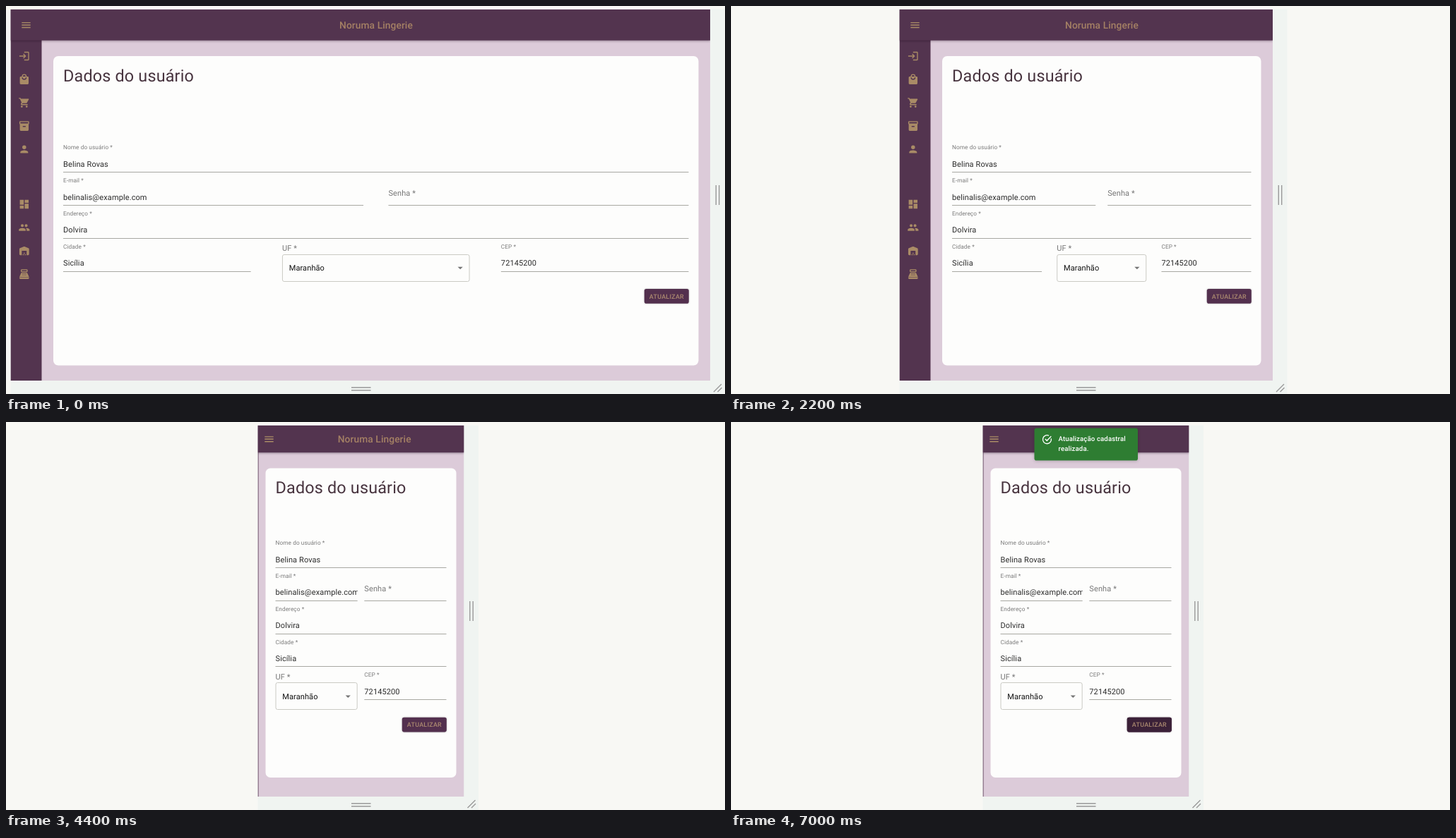
Write an HTML page that moves like this. It is 1018 px wide and 550 px high and loops after 8000 ms.

```html
<!DOCTYPE html>
<html lang="pt-BR">
<head>
<meta charset="utf-8">
<title>Dados do usuário</title>
<style>
  html, body { margin: 0; width: 100%; height: 100%; overflow: hidden; background: #f8f8f4; }
  #stage { display: block; width: 1018px; height: 550px; }
  text { font-family: Roboto, "Open Sans", sans-serif; text-rendering: geometricPrecision; }
  .outside { fill: #f8f8f4; }
  .frame { fill: #f0f4f1; }
  .page { fill: #dccbd9; }
  .card { fill: #fdfdfc; }
  .bar { fill: #53344f; }
  .header { filter: drop-shadow(0 1px 1.5px rgba(30, 10, 30, .4)); }
  .gold { fill: #a98b66; }
  .brand { font-size: 13.75px; font-weight: 500; letter-spacing: .1px; text-anchor: middle; fill: #a48064; }
  .heading { font-size: 23.4px; letter-spacing: .17px; fill: #48343f; }
  .label { font-size: 8.25px; letter-spacing: .08px; fill: #7b7b7b; }
  .value { font-size: 11px; letter-spacing: .1px; fill: #2b2b2b; }
  .option { font-size: 11px; letter-spacing: .1px; fill: #111; }
  .empty { font-size: 11px; letter-spacing: .1px; fill: #777; }
  .rule { stroke: #a8a8a2; stroke-width: 1; }
  .select { fill: none; stroke: #cacac4; stroke-width: 1; }
  .action { font-size: 8.94px; font-weight: 500; letter-spacing: .255px; text-anchor: middle; fill: #ab8a70; }
  .normal { fill: #53304e; filter: drop-shadow(0 .5px .8px rgba(0, 0, 0, .3)); }
  .hover { fill: #3b2138; }
  .pressed { fill: #3b2138; filter: drop-shadow(0 2px 2.5px rgba(30, 10, 60, .35)); }
  .grip { fill: none; stroke: #999; stroke-width: 1.4; }
  .toast { filter: drop-shadow(0 1px 2px rgba(0, 0, 0, .2)); }
  .toast rect { fill: #2e7d32; }
  .toast path { fill: none; stroke: #fff; stroke-width: 1.3; }
  .toast text { font-size: 9.63px; font-weight: 500; letter-spacing: .1px; fill: #fff; }

  .timed { animation: 8s step-end infinite; }
  .tablet { animation-name: tablet; }
  .narrow { animation-name: narrow; }
  .phone { animation-name: phone; }
  .closed { animation-name: closed; }
  .pressed { animation-name: press; }
  .hover { animation-name: hover; }
  .toast { animation-name: toast; }
  @keyframes tablet { 0% { visibility: hidden } 20%, 100% { visibility: visible } }
  @keyframes narrow { 0% { visibility: hidden } 27.5%, 100% { visibility: visible } }
  @keyframes phone { 0% { visibility: hidden } 42.5%, 100% { visibility: visible } }
  @keyframes closed { 0% { visibility: hidden } 52.5%, 100% { visibility: visible } }
  @keyframes press { 0% { opacity: 0 } 70% { opacity: 1 } 75%, 100% { opacity: 0 } }
  @keyframes hover { 0% { opacity: 0 } 75%, 100% { opacity: 1 } }
  @keyframes toast { 0% { opacity: 0 } 72.5% { opacity: .6 } 75%, 100% { opacity: 1 } }
</style>
</head>
<body>
<svg id="stage" viewBox="0 0 1018 550"></svg>
<script>
const TOP = 4.7, BOTTOM = 531, ROW = 46.8, ICON = 0.6875;

const icons = [
  [71, 'M11 7 9.6 8.4l2.6 2.6H2v2h10.2l-2.6 2.6L11 17l5-5zM20 19h-8v2h8c1.1 0 2-.9 2-2V5c0-1.1-.9-2-2-2h-8v2h8z'],
  [104, 'M19 6h-2a5 5 0 0 0-10 0H5a2 2 0 0 0-2 2v12a2 2 0 0 0 2 2h14a2 2 0 0 0 2-2V8a2 2 0 0 0-2-2zm-7-3a3 3 0 0 1 3 3H9a3 3 0 0 1 3-3zm0 10a5 5 0 0 1-5-5h2a3 3 0 0 0 6 0h2a5 5 0 0 1-5 5z'],
  [137, 'M7 18a2 2 0 1 0 0 4 2 2 0 0 0 0-4zM1 2v2h2l3.6 7.6L5.2 14c-.7 1.3.2 3 1.8 3h12v-2H7.4l1.1-2h7.5c.7 0 1.4-.4 1.7-1L21.3 5.5c.4-.7-.1-1.5-.9-1.5H5.2L4.3 2zm16 16a2 2 0 1 0 0 4 2 2 0 0 0 0-4z'],
  [170, 'M20 2H4a2 2 0 0 0-2 2v3c0 .7.4 1.3 1 1.7V20a2 2 0 0 0 2 2h14a2 2 0 0 0 2-2V8.7c.6-.4 1-1 1-1.7V4a2 2 0 0 0-2-2zm-5 12H9v-2h6zm5-7H4V4h16z'],
  [203, 'M12 12a4 4 0 1 0 0-8 4 4 0 0 0 0 8zm0 2c-2.7 0-8 1.3-8 4v2h16v-2c0-2.7-5.3-4-8-4z'],
  [281, 'M3 13h8V3H3zm0 8h8v-6H3zm10 0h8V11h-8zm0-18v6h8V3z'],
  [314, 'M16 11a3 3 0 1 0 0-6 3 3 0 0 0 0 6zm-8 0a3 3 0 1 0 0-6 3 3 0 0 0 0 6zm0 2c-2.3 0-7 1.2-7 3.5V19h14v-2.5C15 14.2 10.3 13 8 13zm8 0-1 .1c1.2.8 2 2 2 3.4V19h6v-2.5c0-2.3-4.7-3.5-7-3.5z'],
  [347, 'M22 19V8.4c0-.9-.5-1.6-1.3-1.9l-8-3.2a2 2 0 0 0-1.4 0l-8 3.2C2.5 6.8 2 7.5 2 8.4V19a2 2 0 0 0 2 2h3v-9h10v9h3a2 2 0 0 0 2-2zm-11 0H9v2h2zm2-3h-2v2h2zm2 3h-2v2h2z'],
  [380, 'M17 2H7a2 2 0 0 0-2 2v2a2 2 0 0 0 2 2h10a2 2 0 0 0 2-2V4a2 2 0 0 0-2-2zm0 4H7V4h10zM2 19h20v1a2 2 0 0 1-2 2H4a2 2 0 0 1-2-2zM18.5 10.2A2 2 0 0 0 16.7 9H7.3a2 2 0 0 0-1.8 1.2L2 18h20zM8 11h2v1H8zm3 0h2v1h-2zm3 0h2v1h-2zM8 14h2v1H8zm3 0h2v1h-2zm3 0h2v1h-2z'],
];
const menuIcon = 'M3 18h18v-2H3zm0-5h18v-2H3zm0-7v2h18V6z';

const rect = (x, y, w, h, cls, r = 0) =>
  `<rect x="${x}" y="${y}" width="${w}" height="${h}" rx="${r}" class="${cls}"/>`;
const text = (x, y, cls, s) => `<text x="${x}" y="${y}" class="${cls}">${s}</text>`;
const icon = (cx, cy, d) =>
  `<path class="gold" fill-rule="evenodd" transform="translate(${cx - 12 * ICON} ${cy - 12 * ICON}) scale(${ICON})" d="${d}"/>`;

// A text field whose underline sits at y
function field(x, y, w, label, value) {
  const line = `<path class="rule" d="M${x} ${Math.floor(y) + .5}h${w}"/>`;
  if (!value) return line + text(x, y - 13.5, 'empty', label);
  return line + text(x, y - 32.3, 'label', label) +
    `<svg x="${x}" y="${y - 20}" width="${w}" height="18">${text(0, 12.2, 'value', value)}</svg>`;
}

function select(x, y, w) {
  return text(x, y - 28.8, 'empty', 'UF *') +
    rect(x + .5, Math.floor(y - 24) + .5, w - 1, 38, 'select', 2.5) +
    text(x + 9.8, y - .8, 'option', 'Maranhão') +
    `<path d="M${x + w - 17} ${y - 6.3}h7.2l-3.6 3.6z" fill="#757575"/>`;
}

function button(right, y, states) {
  return states.map(state => rect(right - 63, y, 63, 20.7, state, 2.8)).join('') +
    text(right - 31.4, y + 13.6, 'action', 'ATUALIZAR');
}

function form(left, right, mobile, states) {
  const w = right - left, half = w * .48, third = w * .3;
  const row = i => (mobile ? 206.5 : 235.6) + ROW * i;
  const city = w => field(left, row(3), w, 'Cidade *', 'Sicília');
  const zip = (w, i) => field(right - w, row(i), w, 'CEP *', '72145200');
  return text(left, mobile ? 101 : 106.7, 'heading', 'Dados do usuário') +
    field(left, row(0), w, 'Nome do usuário *', 'Belina Rovas') +
    field(left, row(1), half, 'E-mail *', 'belinalis@example.com') +
    field(right - half, row(1), half, 'Senha *') +
    field(left, row(2), w, 'Endereço *', 'Dolvira') +
    (mobile
      ? city(w) + select(left, row(4), half) + zip(half, 4)
      : city(third) + select(left + w * .35, row(3), third) + zip(third, 3)) +
    button(right + .3, row(mobile ? 4 : 3) + 25, states);
}

function handles(right) {
  const x = right + 10.5;
  return `<path class="grip" d="M${x - 2.2} 254v28M${x + 2.2} 254v28M489 540.7h27.5M489 544.8h27.5` +
    `M${x - 5.5} 547l11-11M${x} 547l6-6"/>`;
}

function scene({ name, left, right, center, drawer, mobile, states = ['normal'] }) {
  const w = right - left, h = BOTTOM - TOP;
  const headH = mobile ? 38.5 : 44, pad = mobile ? 11 : 16.5, shift = mobile ? -5.5 : 0;
  const cardL = left + drawer + pad, cardR = right - pad;
  const menuY = 5 + headH / 2;
  const drawerIcons = icons.map(([y, d]) => icon(left + 19.3, y + shift, d)).join('');
  return `<g class="timed ${name}">
    ${rect(0, 0, 1018, 550, 'outside')}
    ${rect(left, TOP, w + 20.5, 550 - TOP, 'frame')}
    ${handles(right)}
    <svg x="${left}" y="${TOP}" width="${w}" height="${h}" viewBox="${left} ${TOP} ${w} ${h}">
      ${rect(left, TOP, w, h, 'page')}
      ${rect(cardL, 71 + shift, cardR - cardL, 438.5, 'card', 7)}
      ${rect(left, TOP, drawer || 1, h, 'bar')}
      ${drawer ? drawerIcons : ''}
      ${rect(left, TOP, w, headH, 'bar header')}
      ${icon(left + (mobile ? 16 : 22), menuY, menuIcon)}
      ${text(center, menuY + 4.7, 'brand', 'Noruma Lingerie')}
      ${form(cardL + 14, cardR - 14, mobile, states)}
    </svg></g>`;
}

const toast = `<g class="timed toast">
  ${rect(429.5, 8.8, 146.5, 45.7, '', 2.8)}
  <path d="M453.3 23.3a6 6 0 1 1-3.3-4M444.8 24l2.5 2.5 6-6.2"/>
  ${text(463.5, 27.4, '', 'Atualização cadastral')}${text(463.5, 41.4, '', 'realizada.')}</g>`;

const phone = { left: 356.5, right: 648.5, center: 521.7, mobile: true };
const scenes = [
  { name: 'desktop', left: 6.5, right: 997, center: 524, drawer: 44 },
  { name: 'tablet', left: 150, right: 854.5, center: 524.5, drawer: 44 },
  { name: 'narrow', left: 238.5, right: 767, center: 525, drawer: 44 },
  { name: 'phone', ...phone, drawer: 33 },
  { name: 'closed', ...phone, drawer: 0, states: ['normal', 'timed hover', 'timed pressed'] },
];
document.getElementById('stage').innerHTML = scenes.map(scene).join('') + toast;
</script>
</body>
</html>
```
